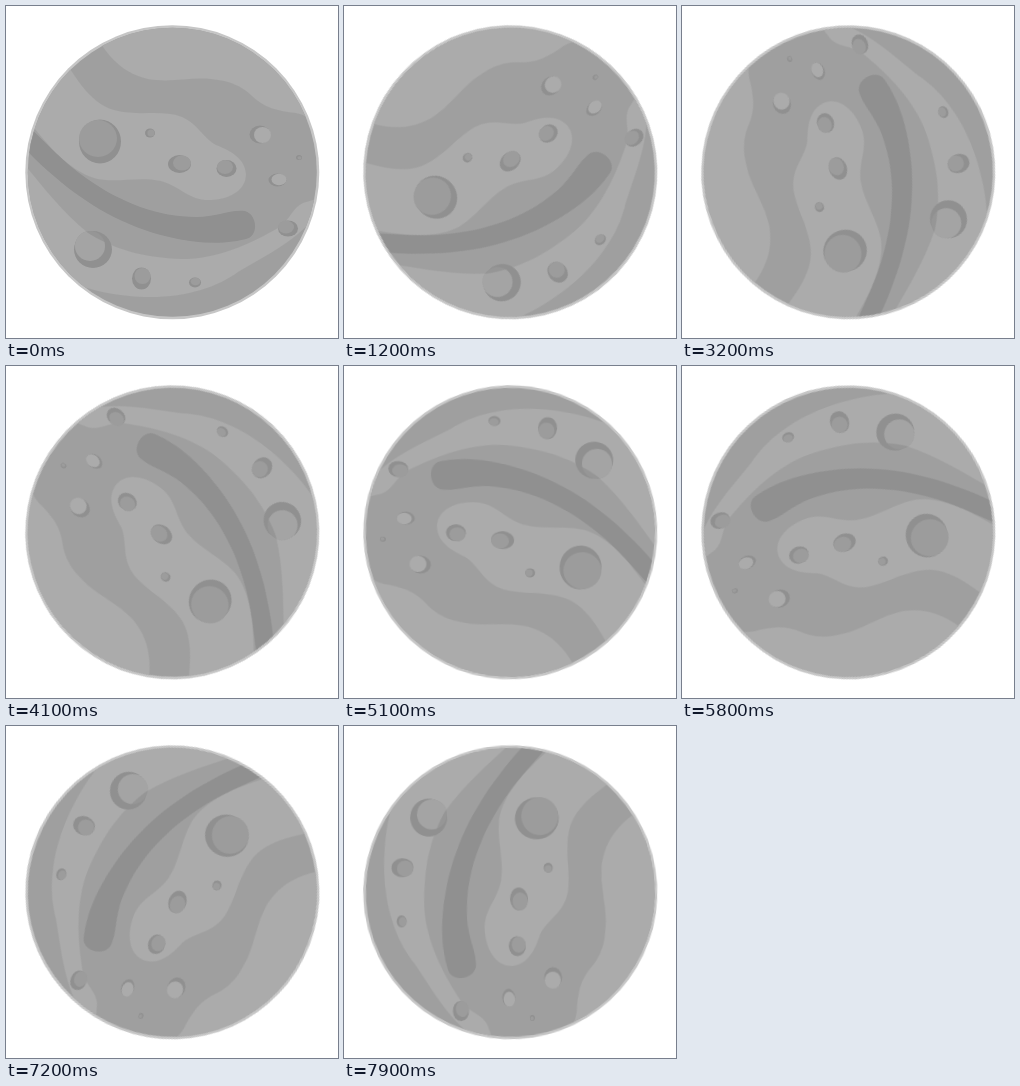
Animation of 332x332 px, one loop 8000 ms. Source, as an HTML page:

```html
<!DOCTYPE html>
<html lang="en">
<head>
<meta charset="utf-8">
<title>Rotating moon</title>
<style>
  html, body { margin: 0; width: 100%; height: 100%; overflow: hidden; background: #fff; }
  svg { display: block; width: 100vw; height: 100vh; }
  #moon { transform-origin: 166.3px 166.3px; animation: spin 8s steps(80, end) infinite; }
  @keyframes spin { to { transform: rotate(-276.8deg); } }
  .light { fill: #ababab; }
  .mid { fill: #9f9f9f; }
  .dark { fill: #909090; }
  .floor { fill: #9c9c9c; }
</style>
</head>
<body>
<svg viewBox="0 0 332 332">
  <defs>
    <clipPath id="disc"><circle cx="166.3" cy="166.3" r="144.5"/></clipPath>
    <clipPath id="pit"><ellipse cx="84" cy="240" rx="15" ry="15"/></clipPath>
    <path id="plain" d="M10 148C30 172 52 202 82 227C112 246 146 253 182 253C218 251 247 236 272 222C284 214 287 201 297 197L320 190L312 205C296 232 262 248 232 266C203 287 155 299 92 285L0 260Z"/>
  </defs>
  <g id="moon">
    <circle cx="166.3" cy="166.3" r="147" fill="#c6c6c6"/>
    <g clip-path="url(#disc)">
      <rect class="mid" width="332" height="332"/>
      <!-- Bright cap and tongue -->
      <path class="light" d="M85 20C97 44 112 66 142 73C165 77 183 71 205 73C225 75 235 80 245 89C258 102 272 105 290 107C300 109 307 114 320 124V0H85Z"/>
      <path class="light" d="M50 42C67 66 82 97 108 104C134 111 154 103 176 111C192 118 196 131 210 139C228 146 239 154 240 168C240 183 226 193 205 194C183 195 176 181 155 175C130 170 109 178 88 172C62 163 44 142 20 112Z"/>
      <use href="#plain" class="light"/>
      <path class="dark" d="M10 108C32 128 52 152 80 172C115 197 153 211 190 211C211 211 224 203 239 205C250 208 253 226 243 232C222 239 191 238 163 231C119 221 80 198 49 171C36 160 23 148 10 132Z"/>
      <g id="craters">
        <ellipse class="dark" cx="94" cy="135.5" rx="21" ry="22"/>
        <ellipse class="floor" cx="92" cy="132.5" rx="19" ry="18.5"/>
        <ellipse class="dark" cx="144" cy="127" rx="5" ry="4.6"/>
        <ellipse class="floor" cx="145" cy="127" rx="3.6" ry="3.5"/>
        <ellipse class="dark" cx="173.5" cy="158" rx="11.5" ry="9"/>
        <ellipse class="floor" cx="176" cy="157" rx="9" ry="7.5"/>
        <ellipse class="dark" cx="220.5" cy="162.5" rx="10" ry="8.5"/>
        <ellipse class="floor" cx="219" cy="161" rx="8" ry="7"/>
        <ellipse class="dark" cx="254" cy="128.5" rx="10.5" ry="9"/>
        <ellipse class="light" cx="256.5" cy="129" rx="8.5" ry="8"/>
        <ellipse class="dark" cx="271.5" cy="174" rx="9" ry="6.5"/>
        <ellipse class="light" cx="273" cy="173.5" rx="7.5" ry="5.8"/>
        <ellipse class="dark" cx="282" cy="222.5" rx="10" ry="8"/>
        <ellipse class="floor" cx="280" cy="221" rx="8" ry="6.5"/>
        <ellipse class="dark" cx="293" cy="151.5" rx="3" ry="2.5"/>
        <ellipse class="floor" cx="293.5" cy="151.8" rx="2" ry="1.6"/>
        <ellipse class="dark" cx="135.5" cy="272.5" rx="9.5" ry="11"/>
        <ellipse class="floor" cx="136.5" cy="270" rx="8" ry="8"/>
        <ellipse class="dark" cx="189" cy="276.5" rx="6" ry="5"/>
        <ellipse class="floor" cx="189.5" cy="275.5" rx="4.8" ry="3.8"/>
        <ellipse class="dark" cx="87" cy="243.5" rx="19" ry="18.5"/>
        <g clip-path="url(#pit)">
          <rect x="60" y="220" width="50" height="50" fill="#969696"/>
          <use href="#plain" fill="#a4a4a4"/>
        </g>
      </g>
    </g>
  </g>
</svg>
</body>
</html>
```
